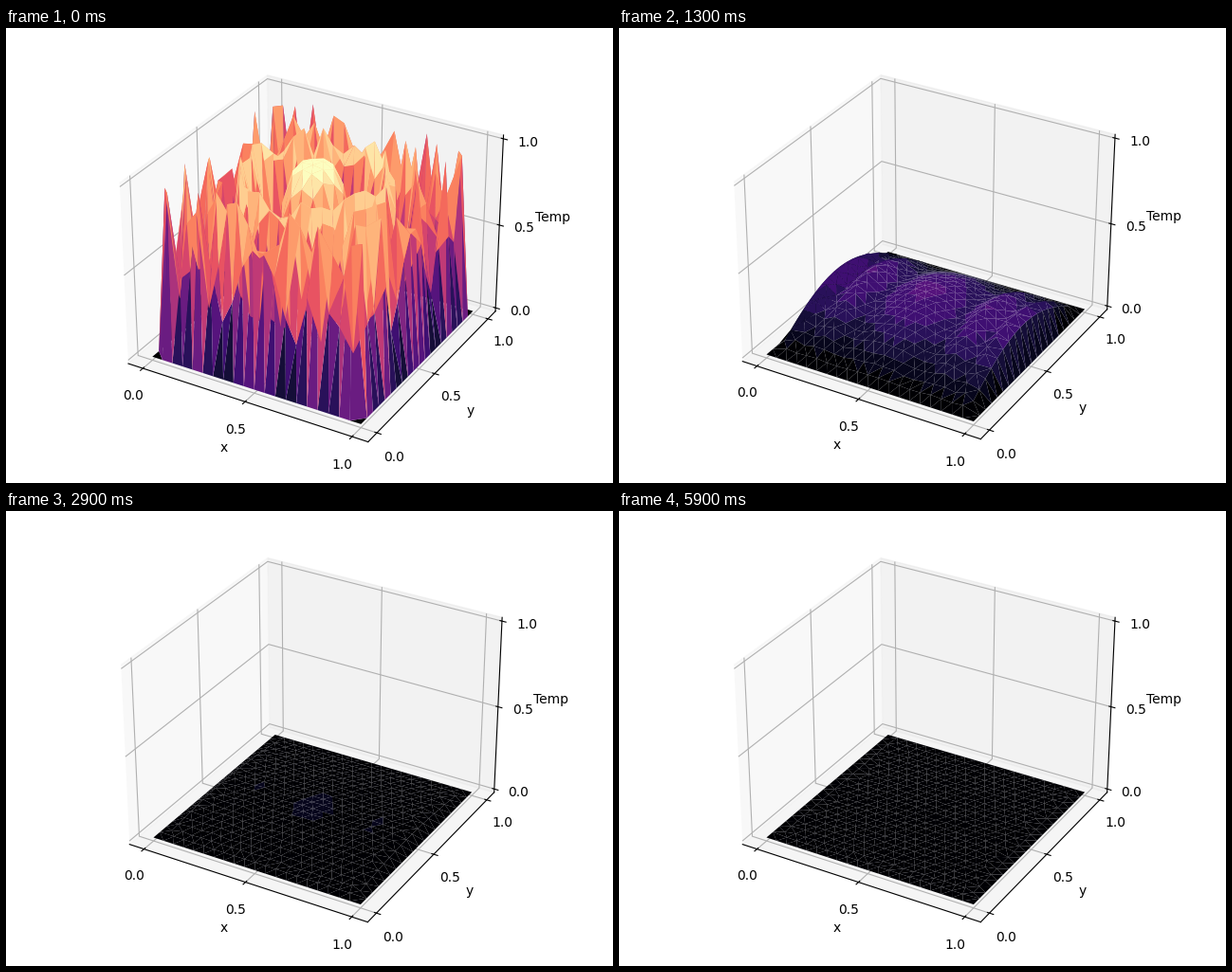
Write a matplotlib script that moves like this. It is 640 by 480 pixels and loops after 6000 ms.

```python
import numpy as np
import matplotlib.pyplot as plt
from matplotlib.animation import FuncAnimation
from matplotlib.tri import Triangulation
from mpl_toolkits.mplot3d.art3d import Poly3DCollection

W, H = 640, 480
FRAMES, INTERVAL = 60, 100
ALPHA_X, ALPHA_Y = 1.5e-5, 0.01   # diffusivity per frame
SIDE = 20                         # mesh edges along each side


def initial(x, y):
    """Concentric rings that get tighter away from the centre."""
    r2 = (x - 0.5) ** 2 + (y - 0.5) ** 2
    return 0.65 + 0.35 * np.cos(66 * r2)


def along_sides(steps, depth):
    """Points on all four sides, moved inwards by depth."""
    return [p for s in steps for p in
            ((s, depth), (1 - depth, s), (1 - s, 1 - depth), (depth, 1 - s))]


def make_mesh():
    """Near-equilateral triangles filling the unit square."""
    rng = np.random.default_rng(4)
    edge = np.arange(SIDE) / SIDE
    row_gap = np.sqrt(0.75) / SIDE
    points = along_sides(edge, 0)
    points += along_sides(edge[1:-1] + 0.5 / SIDE, row_gap)
    start = 2 * row_gap
    for row, y in enumerate(np.linspace(start, 1 - start, 20)):
        odd = row % 2
        x0 = start + 0.024 * odd
        for x in np.linspace(x0, 1 - x0, 18 - odd):
            dx, dy = rng.uniform(-0.004, 0.004, 2)
            points.append((x + dx, y + dy))
    x, y = np.array(points).T
    return x, y, Triangulation(x, y).triangles


px, py, tris = make_mesh()
inside = (px > 0) & (px < 1) & (py > 0) & (py < 1)

# Sine expansion of the heat equation with cold borders
N = 240
modes = np.arange(1, 121)
s = (np.arange(N) + 0.5) / N
basis = np.sin(np.pi * np.outer(modes, s))
coef = 4 / N**2 * basis @ initial(s[:, None], s[None, :]) @ basis.T
basis_x = np.sin(np.pi * np.outer(px, modes))
basis_y = np.sin(np.pi * np.outer(py, modes))


def temperature(t):
    if t == 0:
        return np.where(inside, initial(px, py), 0)
    decay_x = np.exp(-ALPHA_X * (np.pi * modes) ** 2 * t)
    decay_y = np.exp(-ALPHA_Y * (np.pi * modes) ** 2 * t)
    z = ((basis_x * decay_x) @ coef * (basis_y * decay_y)).sum(axis=1)
    return np.where(inside, z, 0)


def show(z):
    surface.set_verts(np.stack([px, py, z], axis=1)[tris])
    surface.set_array(z[tris].mean(axis=1))


fig = plt.figure(figsize=(W / 100, H / 100), dpi=100)
ax = fig.add_subplot(projection="3d")
pad = 0.05 + 1.1 / 48
ax.set_xlim(-pad, 1 + pad)
ax.set_ylim(-pad, 1 + pad)
ax.set_zlim(-1 / 48, 1 + 1 / 48)
for axis in (ax.xaxis, ax.yaxis, ax.zaxis):
    axis.set_ticks([0, 0.5, 1])
ax.set_xlabel("x")
ax.set_ylabel("y")
ax.set_zlabel("Temp")

surface = Poly3DCollection(np.zeros((1, 3, 3)), cmap=plt.get_cmap("magma", 20))
surface.set_clim(0, 1)
show(temperature(0))
ax.add_collection3d(surface)

# The layout makes room for the tick labels only after the first draw
MARGIN = 15
fig.subplots_adjust(left=MARGIN / W, right=1 - MARGIN / W,
                    bottom=MARGIN / H, top=1 - MARGIN / H)
fig.draw_without_rendering()
fig.tight_layout()
settled = fig.subplotpars.bottom


def update(frame):
    fig.subplots_adjust(bottom=settled if frame else MARGIN / H)
    show(temperature(frame))
    return (surface,)


anim = FuncAnimation(fig, update, frames=FRAMES, interval=INTERVAL, repeat=True)
plt.show()
```
